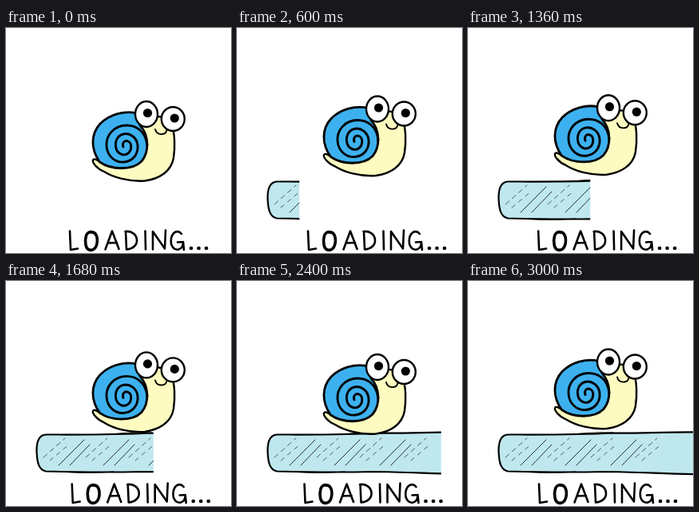
An HTML page for the animation above (3040 ms loop, 282 by 282 pixels).

```html
<!DOCTYPE html>
<html lang="en">
<head>
<meta charset="utf-8">
<title>Loading</title>
<style>
  html, body { margin: 0; width: 100%; height: 100%; overflow: hidden; background: #fff; }
  svg { display: block; width: 100vw; height: 100vh; }
  path, ellipse { stroke: #000; stroke-linecap: round; stroke-linejoin: round; }
  .line { fill: none; }
</style>
</head>
<body>
<svg viewBox="0 0 282 282">
  <clipPath id="wipe"><rect id="edge" x="0" y="180" width="0" height="70"/></clipPath>

  <g clip-path="url(#wipe)">
    <path fill="#bfe7ee" stroke-width="2.2" d="M300 189.5C250 189 215 191 180 190.5C140 193 85 192.5 50 192.5C41 193 38 203 38.5 215C39 227 41 237 50 238.5C90 239.500 130 240 170 239C210 239 250 242 300 242.500"/>
    <path class="line" stroke-width="1" d="M120 192.5C140 191.5 160 189 182 190M75 239.5C95 241 115 240.500 135 239"/>
    <g id="shine"></g>
  </g>

  <g id="snail" stroke-width="2.4">
    <path fill="#fdfbc0" d="M168 117C178 108 198 108 207 120C212 131 212 150 210 163C207 180 192 189 174 191.500C154 193 134 187 123 180C113 176 108 168 109 165.500C110 163 114 165 118 168C140 178 160 160 168 117Z"/>
    <path fill="#3db1ef" stroke-width="2.8" d="M163 106.500C148 103.500 130 108 118 120C106 133 106 152 117.500 168C132 178 158 179 170 167C180 155 179 134 168 122Z"/>
    <path class="line" stroke-width="2.9" d="M177 147C175 129 163 122 151 122C135 122 125 135 126 148C127 161 137 169 148 168C159 167 166 158 165 147C164 137 155 131 147 133C139 135 136 143 138 151C140 158 148 161 153 157C158 153 158 144 153 142C149 140 145 144 147 149"/>
    <path class="line" stroke-width="1.9" d="M187 127C189 135 200 135 201.500 128"/>
    <ellipse cx="176" cy="108" rx="14" ry="16" fill="#fff"/>
    <ellipse cx="209.300" cy="114" rx="14.500" ry="15" fill="#fff"/>
    <circle cx="177.500" cy="106.500" r="5.600"/>
    <circle cx="211.300" cy="113" r="5.600"/>
  </g>

  <g id="word" class="line" role="img" aria-label="LOADING..." stroke-width="2.6">
    <path d="M79 254.500L80 278L89 276.500"/>
    <path stroke-width="3.600" d="M106 255.500C99 255 97.500 265 99 272C101 281 110 280 112.500 272C115 263 112 255 105 256"/>
    <path d="M123.500 277.500L132 254.500L140.500 277M126.500 269.500L138 269"/>
    <path d="M149 255L150 277.500C158 277 163.500 272 163 265.500C162.500 258 155.500 254 148.500 255"/>
    <path d="M173.500 254.500L174 277.500"/>
    <path d="M183 277.500L183 255L198 276.500L199 253.500"/>
    <path d="M219 258C214 252 207.500 256 206 264C204.500 274 210.500 279 215.500 277.500C219.500 276.500 221 272 221 268L214 268.500M221 268L222 278"/>
    <path stroke-width="4.600" d="M231 276h.1M240.500 276h.1M250 276h.1"/>
  </g>
</svg>
<script>
  const LOOP = 3040, STEP = 40, HALF = 400;
  const $ = id => document.getElementById(id);

  // Slanted glints on the bar: solid pairs with broken strokes between them
  const stroke = (x, y, dx, dy, dash = "") =>
    `<path d="M${x} ${y}l${dx} ${-dy}" stroke-linecap="butt" stroke-width="${dash ? 0.6 : 0.8}" stroke-dasharray="${dash}"/>`;
  let shine = "";
  for (const x of [66, 122, 179])
    shine += stroke(x, 231, 32, 32) + stroke(x + 14, 231, 25, 26);
  for (const x of [47, 100, 154, 210])
    shine += stroke(x, 221, 27, 24, "6 5") + stroke(x + 8, 225, 25, 21, "5 6");
  $("shine").innerHTML = shine;

  // Linear there-and-back: 0 at t = 0, 1 at HALF, 0 at 2 * HALF
  const swing = t => 1 - Math.abs(1 - (t / HALF) % 2);

  function draw(now) {
    const t = Math.floor((now % LOOP) / STEP) * STEP;
    $("edge").setAttribute("width", 19 + 300 * t / LOOP);
    $("snail").setAttribute("transform", `translate(0 ${-13 * swing(t)})`);
    $("word").setAttribute("transform", `translate(${1 + 9 * swing(Math.max(0, t - 200))} 0)`);
  }

  const start = performance.now();
  (function tick() {
    draw(performance.now() - start);
    requestAnimationFrame(tick);
  })();
</script>
</body>
</html>
```
